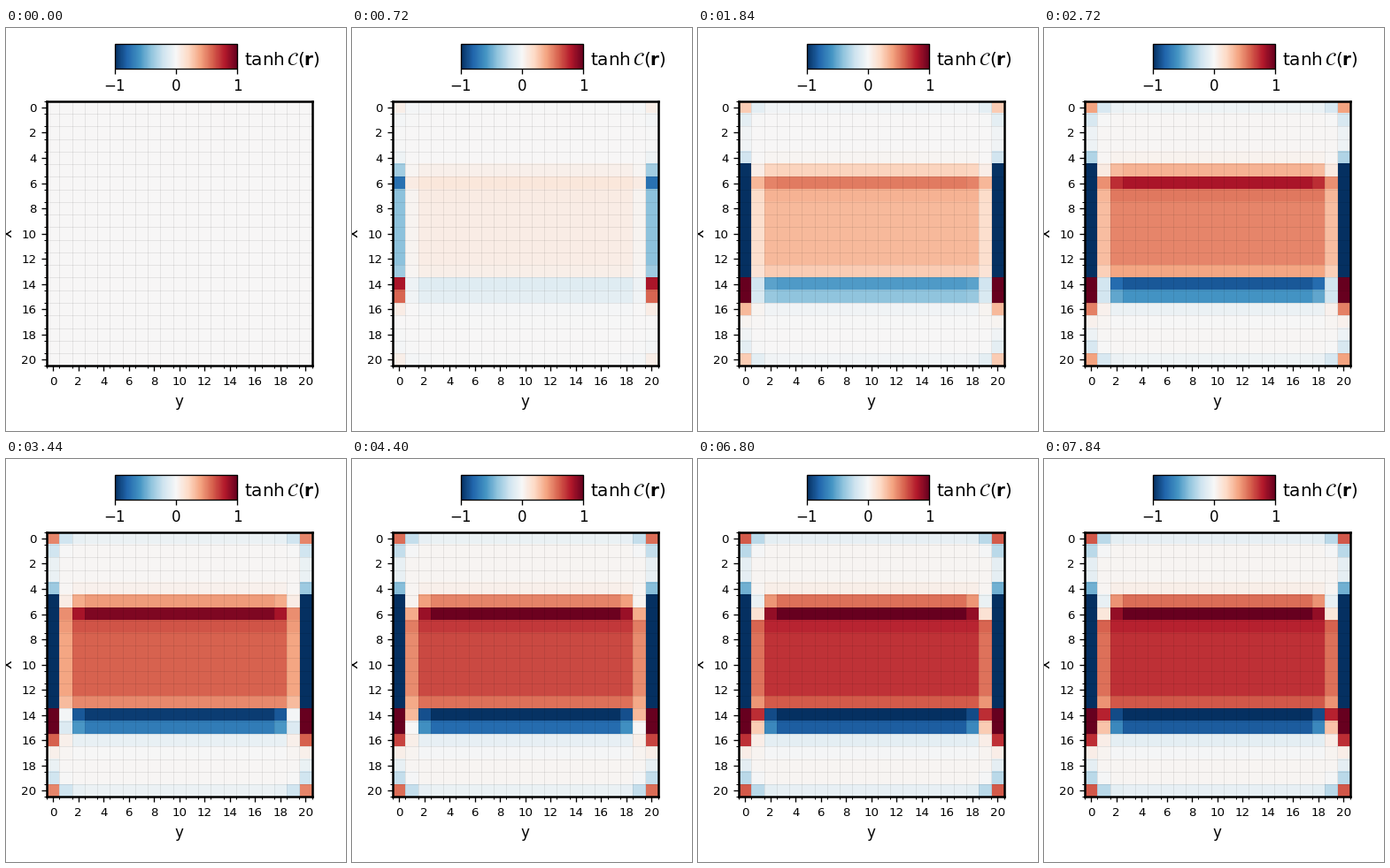
A matplotlib script for the animation above (8000 ms loop, 384 by 456 pixels).

```python
import numpy as np
import matplotlib.pyplot as plt
from matplotlib.animation import FuncAnimation

W, H, DPI = 384, 456, 120
N, FRAMES, STEP = 21, 100, 80
BAND_EDGE = [5, 6, 14, 15]


def outer_levels():
    """Final levels around the band: columns 0, 1, 2 and the repeated inner one."""
    level = np.full((N, 4), .02)
    level[[0, -1]] = [.73, -.28, -.1, -.08]
    level[[1, -2]] = [-.28, -.01, .02, .02]
    level[[2, 3, -3], 0] = -.09
    level[4] = [-.53, .02, .06, .06]
    level[16] = [.95, .07, -.1, -.1]
    level[17] = [.07, .03, -.01, -.01]
    return level


def inner_levels(growth):
    """Levels of the band, rows 5 to 15; its two strong rows sharpen with time."""
    band = np.full(11, .93) * growth
    sharp = growth * (1.4 + 1.7 * growth ** 2)
    band[[0, 2, 8, 10]] = growth * np.array([.63, 1.02, .725, -1.19])
    band[[1, 9]] = sharp, -1.1 * sharp
    return band


def limited(level, final):
    cap = .8 * np.sqrt(np.abs(final))
    return cap * np.tanh(level / cap)


OUTER = outer_levels()
FINAL = inner_levels(1)
MIRROR = [min(c, N - 1 - c, 3) for c in range(N)]

# Left border of the band grows much faster and saturates
BORDER = np.full(11, -.44)
BORDER[[0, 1, 8, 9, 10]] = -.36, -.97, -.37, 1.14, .66


def field(frame):
    t = min(max(frame - 1, 0), 97)
    growth = 1 - np.exp(-(t / 36) ** 1.65)
    level = OUTER * growth
    band = inner_levels(growth)
    level[5:16, 0] = BORDER * (t / 8) ** 2
    level[5:16, 1] = .67 * band * growth ** .25
    level[5:16, 2:] = band[:, None]

    # Next to the border the band's end rows turn back and change sign
    early = np.array([.2, 1, -.6, -.45])
    late = np.array([-.28, -.9, 1.65, .76])
    level[BAND_EDGE, 1] = early * growth + late * growth ** 4.3
    ends = np.array(BAND_EDGE) - 5
    level[BAND_EDGE, 2] = limited(band[ends], FINAL[ends])
    return np.tanh(level)[:, MIRROR]


plt.rcParams["font.family"] = "DejaVu Sans"
fig = plt.figure(figsize=(W / DPI, H / DPI), dpi=DPI, facecolor="white")

side = .78 * W / H
ax = fig.add_axes([.12, .49 - side / 2, .78, side])
image = ax.imshow(field(0), cmap="RdBu_r", vmin=-1, vmax=1,
                  aspect="auto", interpolation="nearest")
for axis in (ax.xaxis, ax.yaxis):
    axis.set_ticks(np.arange(0, N, 2))
    axis.set_ticks(np.arange(-.5, N), minor=True)
ax.tick_params(labelsize=8)
ax.grid(which="minor", color="black", alpha=.15, linewidth=.3)
ax.set_xlabel("y", fontsize=10)
ax.set_ylabel("x", fontsize=10)
for spine in ax.spines.values():
    spine.set_linewidth(1.5)

bar = fig.colorbar(image, cax=fig.add_axes([.32, .9, .36, .06]),
                   orientation="horizontal", ticks=[-1, 0, 1])
bar.ax.tick_params(labelsize=10)
fig.text(268.7 / W, 1 - 42 / H, r"$\tanh\mathcal{C}(\mathbf{r})$",
         fontsize=12, va="baseline")


def update(frame):
    image.set_data(field(frame))
    return [image]


anim = FuncAnimation(fig, update, frames=FRAMES, interval=STEP,
                     repeat=True, repeat_delay=0)
plt.show()
```
